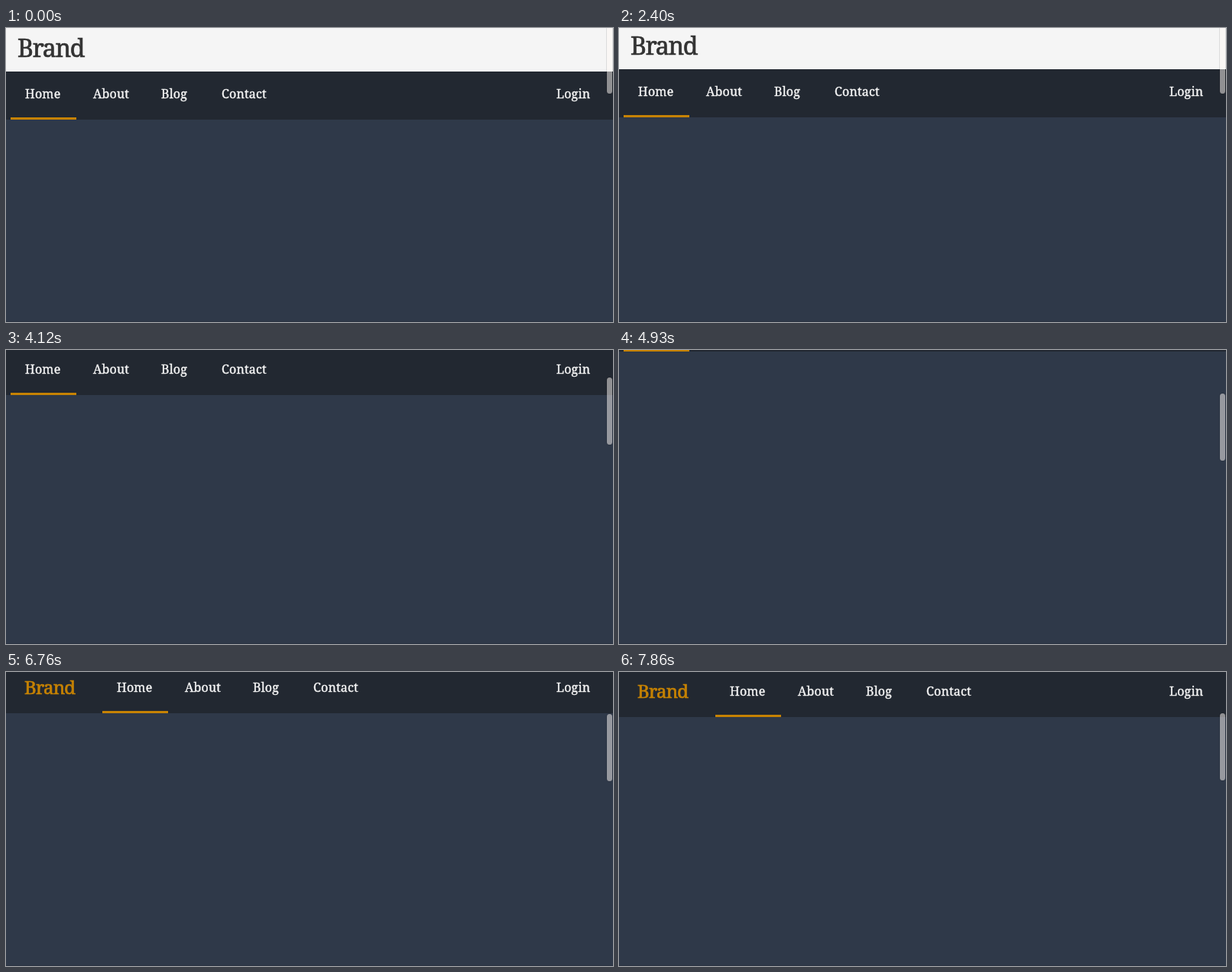
An HTML page for the animation above (8000 ms loop, 794 by 385 pixels).

```html
<!DOCTYPE html>
<html lang="en">
<head>
<meta charset="utf-8">
<title>Sticky navigation</title>
<style>
  html, body { margin: 0; width: 100%; height: 100%; overflow: hidden; background: #2f3949; }
  #stage { position: relative; width: 794px; height: 385px; overflow: hidden; background: #2f3949;
    box-shadow: inset 0 -1px #2a3241; font: 16px/20px "Noto Serif", serif; color: #f5f5f5; }
  #stage * { position: absolute; white-space: nowrap; }
  header { left: 0; top: -63px; width: 100%; height: 120px; background: #f5f5f5; color: #333; }
  header span { left: 15px; top: 69px; font-size: 32px; line-height: 40px; letter-spacing: -1.3px;
    -webkit-text-stroke: .7px; }
  nav { left: 0; top: 0; width: 100%; height: 63px; background: #222831; letter-spacing: .2px;
    -webkit-text-stroke: .4px; }
  nav span { top: 19px; }
  #logo { left: 24px; top: 14px; font-size: 24px; line-height: 30px; letter-spacing: -.8px;
    color: #c68203; -webkit-text-stroke: .7px; }
  #links { left: 0; top: 0; width: 400px; height: 63px; }
  #links i { left: 6px; top: 60px; width: 86px; height: 3px; background: #c68203; }
  #thumb { left: 786px; top: 0; width: 7px; height: 88px; border-radius: 4px;
    background: rgba(255, 250, 245, .5); box-shadow: 0 0 0 1px rgba(0, 0, 0, .1); }
</style>
</head>
<body>
<div id="stage">
  <header id="head"><span>Brand</span></header>
  <nav id="nav">
    <span id="logo">Brand</span>
    <div id="links">
      <span style="left:25px">Home</span>
      <span style="left:114px">About</span>
      <span style="left:203px">Blog</span>
      <span style="left:282px">Contact</span>
      <i></i>
    </div>
    <span style="left:720px">Login</span>
  </nav>
  <div id="thumb"></div>
</div>
<script>
  const LOOP = 8000, TOP = -4, NAV_H = 63, NAV_Y = 57, THUMB_RATIO = 0.213, SLIDE_MS = 300;
  const $ = id => document.getElementById(id);
  const head = $('head'), nav = $('nav'), logo = $('logo'), links = $('links'), thumb = $('thumb');

  const ramp = (t, from, to) => Math.min(1, Math.max(0, (t - from) / (to - from)));
  const glide = (t, from) => 1 - (1 - ramp(t, from, from + SLIDE_MS)) ** 2;

  // Two long scrolls down, then a short nudge up, down and up again
  const scrollAt = t => 61 * ramp(t, 2370, 2955) + 231 * ramp(t, 3120, 5020)
    + 28 * (ramp(t, 6700, 7060) - ramp(t, 5650, 6220) - ramp(t, 7490, 7860));

  // The bar leaves on scrolling down and returns on scrolling up
  const hiddenAt = t => glide(t, 4720) - glide(t, 5860) + glide(t, 6750) - glide(t, 7530);

  const thumbAlpha = t => t < 2400 ? 1 - ramp(t, 540, 670) : 1;

  const moveY = (el, y) => { el.style.transform = `translateY(${y}px)`; };

  function draw(t) {
    const y = Math.round(scrollAt(t));
    const branded = t > 5100;
    moveY(head, -y);
    moveY(nav, Math.max(NAV_Y - y, TOP) - Math.round(NAV_H * hiddenAt(t)));
    moveY(thumb, Math.floor(y * THUMB_RATIO) - 2);
    thumb.style.opacity = thumbAlpha(t);
    logo.style.visibility = branded ? 'visible' : 'hidden';
    links.style.left = branded ? '120px' : '0';
  }

  const start = performance.now();
  function tick() {
    draw((performance.now() - start) % LOOP);
    requestAnimationFrame(tick);
  }
  tick();
</script>
</body>
</html>
```
